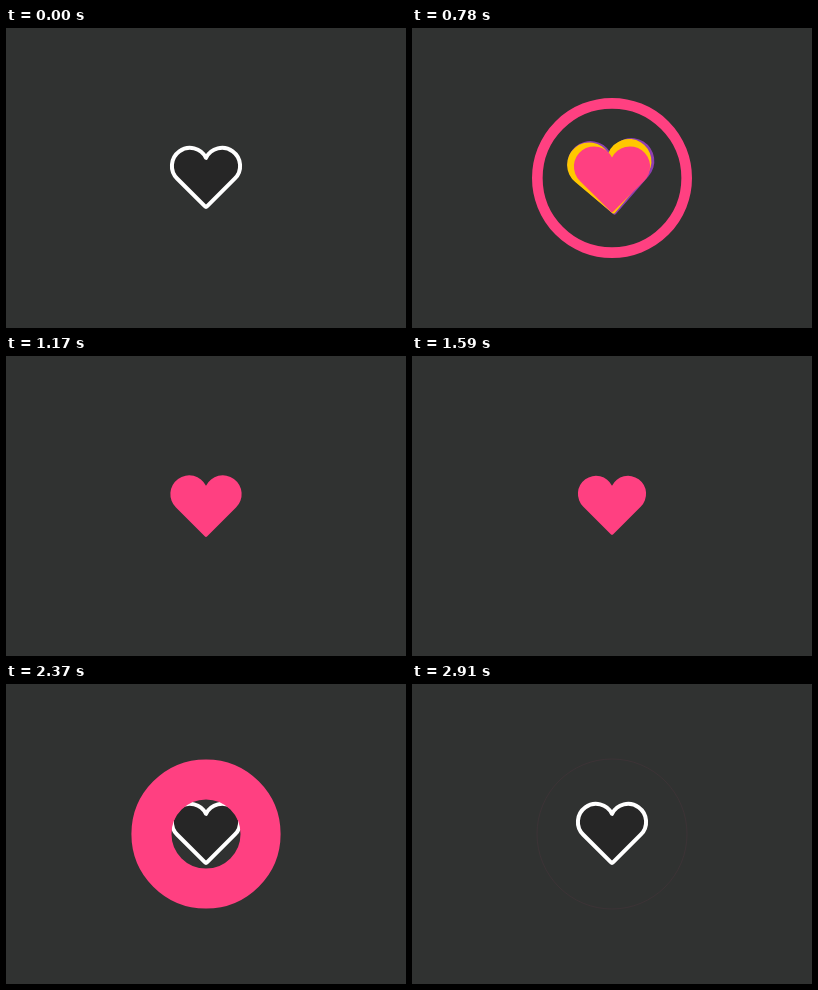
Animation, 400 px wide and 300 px high, one loop 3.39 s. Source, as an HTML page:

```html
<!DOCTYPE html>
<html lang="en">
<head>
<meta charset="utf-8">
<title>Heart toggle</title>
<style>
  html, body { margin: 0; width: 100%; height: 100%; overflow: hidden; background: #303231; }
  svg { display: block; width: 100%; height: 100%; }
</style>
</head>
<body>
<svg viewBox="0 0 400 300">
  <defs>
    <path id="heart" d="M0 -20.2A18 18 0 1 0 -28.7 .7L-1.2 28.2Q0 29.4 1.2 28.2L28.7 .7A18 18 0 1 0 0 -20.2Z"/>
  </defs>
  <g transform="translate(200 150)">
    <use id="outline" href="#heart" fill="#262626" stroke="#fff" stroke-width="4" stroke-linejoin="round"/>
    <use id="purple" href="#heart" fill="#8e3fb0"/>
    <use id="yellow" href="#heart" fill="#ffc800"/>
    <use id="pink" href="#heart" fill="#ff4081"/>
    <circle id="ring" fill="none" stroke="#ff4081"/>
    <circle id="trace" r="75" fill="none" stroke="#ff4081" stroke-width="1" opacity=".06"/>
  </g>
</svg>
<script>
const LOOP = 3390, STEP = 30, SECOND = 1800, BURST = 480, END = 1110;
const el = id => document.getElementById(id);
const outline = el('outline'), purple = el('purple'), yellow = el('yellow');
const pink = el('pink'), ring = el('ring'), trace = el('trace');

// time, radius, speed
const GROWTH = [
  [30, 0, .02], [330, 22, .16], [480, 52, .23], [570, 74.6, .22],
  [660, 85.6, 0], [780, 80, -.04], [870, 77, -.022], [END, 75, 0]
];

function radius(t) {
  if (t <= GROWTH[0][0]) return 0;
  const i = GROWTH.findIndex(p => p[0] >= t);
  if (i < 0) return 75;
  const [t0, a, va] = GROWTH[i - 1], [t1, b, vb] = GROWTH[i];
  const d = t1 - t0, u = (t - t0) / d, w = 1 - u;
  return a * (1 + 2 * u) * w * w + va * d * u * w * w
       + b * u * u * (3 - 2 * u) - vb * d * u * u * w;
}

function hole(t) {
  const u = Math.min(1, Math.max(0, (t - BURST) / (END - BURST)));
  return 75 * (1 - (1 - u) ** 4);
}

function elastic(t, start) {
  const u = (t - start) / 1080;
  if (u <= 0) return 0;
  if (u >= 1) return 1;
  return 1 + 2 ** (-10 * u) * Math.sin((u - .075) * 2 * Math.PI / .3);
}

function show(node, on) {
  node.style.display = on ? '' : 'none';
}

function place(node, s, x, y, angle) {
  node.setAttribute('transform', `translate(${x} ${y}) rotate(${angle}) scale(${s})`);
}

function drawRing(t) {
  const r = radius(t), h = hole(t), w = r - h;
  show(ring, r > 0 && t < END && w > 0);
  ring.setAttribute('r', (r + h) / 2);
  ring.setAttribute('stroke-width', Math.max(0, w));
}

function draw(t) {
  const liked = t >= BURST && t < SECOND + BURST;
  show(outline, !liked);
  show(pink, liked);
  const colours = liked && t < END;
  show(purple, colours);
  show(yellow, colours);

  const p = elastic(t, 595), y = elastic(t, 587), k = elastic(t, 688);
  place(purple, p, 0, 0, -15 * (p - 1));
  place(yellow, y, -6 * (y - 1), 0, -21 * (y - 1));
  place(pink, k, 0, 18 * (k - 1), 0);

  drawRing(t < 1500 ? t : t - SECOND);
  show(trace, t >= SECOND + END);
}

const begin = performance.now();
function tick() {
  const t = (performance.now() - begin) % LOOP;
  draw(Math.floor(t / STEP) * STEP);
  requestAnimationFrame(tick);
}
tick();
</script>
</body>
</html>
```
